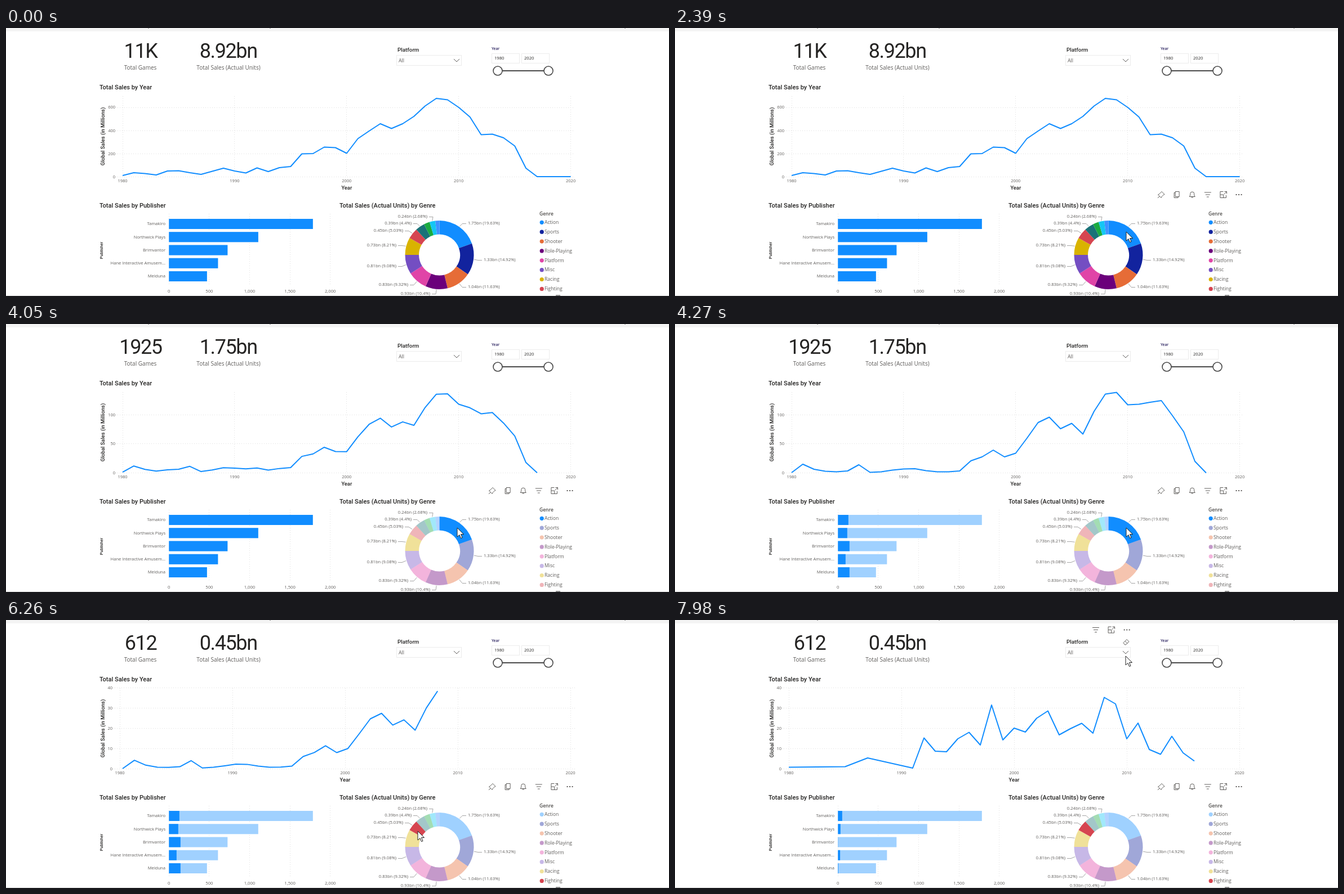
An HTML page with a canvas for the animation above (8000 ms loop, 1177x476 px).

```html
<!DOCTYPE html>
<html lang="en">
<head>
<meta charset="utf-8">
<title>Sales dashboard</title>
<style>
html, body { margin: 0; width: 100%; height: 100%; overflow: hidden; background: #fff; }
canvas { display: block; }
</style>
</head>
<body>
<canvas id="stage" width="1177" height="476"></canvas>
<script>
const ctx = document.getElementById('stage').getContext('2d');
const LOOP = 8000, BASE = 264.3;
const INK = '#252423', GREY = '#605e5c', BLUE = '#118dff';
const SANS = '"Open Sans", sans-serif', DIN = 'Roboto, sans-serif';

// Line heights are y positions on the stage, one per year.
const allYears = [262, 257, 258.5, 261, 254, 253.5, 257, 260, 254.5, 249, 254, 257.5, 248.5, 255,
  248, 246, 223.5, 223, 211.5, 212.5, 222.5, 196.5, 183, 170, 178.5, 170, 157, 138.5, 125, 127.5,
  141, 158, 189.5, 188.5, 195, 209.5, 249, 264, 264, 264, 264];
const actionYears = [264, 249, 258, 261.5, 262.5, 261, 250, 263.5, 262.5, 259.5, 257.5, 257, 260.5, 262.5,
  262.5, 261, 243, 236, 224, 236, 229.5, 203, 175, 165.5, 186, 176.5, 195.5, 155, 124.5, 121.5,
  143.5, 142.5, 139, 136, 163, 191.5, 244, 264.5];
const fightingYears = [261.5, 260.5, 245, 263, 209.5, 233, 234, 211, 199.5, 222, 151, 213, 192, 199,
  174.5, 161.5, 204, 193, 183.5, 201, 137.5, 149, 211, 183, 230, 238.5, 206.5, 236, 250.5];

const place = (ys, left, step, yearOf = i => i) => ys.map((y, i) => [left + step * yearOf(i), y]);
const views = [
  { games: '11K', sales: '8.92bn', left: 207, step: 19.89, tick: 200, gap: 41.1, ticks: 4, picked: -1,
    bars: [255.5, 158.5, 104, 87, 67.5], line: place(allYears, 207, 19.89) },
  { games: '1925', sales: '1.75bn', left: 207, step: 19.89, tick: 50, gap: 51.4, ticks: 3, picked: 0,
    bars: [18.5, 16.5, 20.5, 13.5, 20.5], line: place(actionYears, 207, 19.89) },
  { games: '612', sales: '0.45bn', left: 202, step: 20, tick: 10, gap: 35.9, ticks: 5, picked: 7,
    bars: [7.5, 4.5, .3, 3.8, .8],
    line: place(fightingYears, 202, 20, i => i < 3 ? [0, 5, 7][i] : i + 8) }
];
const clicks = [
  { pick: 3290, cards: 3500, line: [3800, 4270], bars: [4040, 4270] },
  { pick: 5910, cards: 6120, line: [6200, 6600], bars: [6380, 6600] }
];

const publishers = ['Tamakiro', 'Northwick Plays', 'Brimvantor', 'Hane Interactive Amusem...', 'Melduna'];
const genres = ['Action', 'Sports', 'Shooter', 'Role-Playing', 'Platform', 'Misc', 'Racing', 'Fighting'];
const shares = [19.63, 14.92, 11.63, 10.4, 9.32, 9.08, 8.21, 5.03, 4.4, 2.74, 2.68, 1.96];
const colors = [BLUE, '#12239e', '#e66c37', '#6b007b', '#e044a7', '#744ec2', '#d9b300', '#d64550',
  '#197278', '#1aab40', '#15c6f4', '#4092ff'];
const callouts = [
  ['1.75bn (19.63%)', 0, 820, 347], ['1.33bn (14.92%)', 1, 848, 412], ['1.04bn (11.63%)', 2, 820, 460],
  ['0.93bn (10.4%)', 3, 753, 472], ['0.83bn (9.32%)', 4, 714, 456], ['0.81bn (9.08%)', 5, 693, 423],
  ['0.73bn (8.21%)', 6, 693, 386], ['0.45bn (5.03%)', 7, 705, 360], ['0.39bn (4.4%)', 8, 720, 347],
  ['0.24bn (2.68%)', 10, 748, 335]
];
// time, x, y
const pointer = [[400, 1081, 450], [720, 922, 318], [965, 922, 318], [970, 921, 317], [1130, 921, 317],
  [1230, 901, 309], [1890, 806, 357], [1940, 806, 357], [2390, 801, 362], [4880, 801, 362],
  [4980, 788, 360], [5250, 788, 360], [5350, 742, 355], [5440, 718, 364], [5680, 731, 375],
  [7170, 731, 375], [7900, 800, 65], [7980, 800, 64]];

const icons = {
  pin: 'M1-5.5L6-.5L4 .5L1 3.5L0 5.5L-5.5 0L-3.5-1L-.5-4ZM-3 3L-6 6',
  copy: 'M-2.5-5.5H4.5V3.5H-2.5ZM-2.5-3.5H-4.5V5.5H2.5V3.5',
  bell: 'M-5 3.5H5L3.5 1V-1.5A3.5 3.5 0 0 0-3.5-1.5V1ZM-1.5 3.5A1.5 1.8 0 0 0 1.5 3.5',
  filter: 'M-6-4H6M-4 0H4M-2 4H2',
  focus: 'M0-5.5H-5.5V5.5H5V1M2-5.5H6V-1.5M6-5.5L1-.5M-5.5 0H0V5.5',
  more: 'M-5.5 0h2M-1 0h2M3.5 0h2',
  eraser: 'M-5 1.5L1-4.5L5-.5L-1 5H-2.5ZM-2-1.5L2 2.5',
  chevron: 'M-5-2.5L0 2.5L5-2.5',
  arrow: 'M0 0V16L4 12.5L6.5 18.5L9 17.5L6.5 11.5H11.5Z'
};
for (const name in icons) icons[name] = new Path2D(icons[name]);

const mix = (a, b, p) => a + (b - a) * p;
const progress = (t, [from, to]) => Math.min(1, Math.max(0, (t - from) / (to - from)));
const ease = p => p < .5 ? 4 * p ** 3 : 1 - 4 * (1 - p) ** 3;

function text(str, x, y, size, { font = SANS, color = GREY, align = 'left', weight = 400, spacing = 0 } = {}) {
  ctx.font = `${weight} ${size}px ${font}`;
  ctx.letterSpacing = spacing + 'px';
  ctx.fillStyle = color;
  ctx.textAlign = align;
  ctx.fillText(str, x, y + .5);
}
const title = (str, x, y, size = 11, align = 'left') =>
  text(str, x, y, size, { font: DIN, color: INK, weight: 500, align });

function upright(str, x, y, size) {
  ctx.save();
  ctx.translate(x, y);
  ctx.rotate(-Math.PI / 2);
  title(str, 0, 0, size, 'center');
  ctx.restore();
}
function polyline(points, color, width, dash = []) {
  ctx.beginPath();
  points.forEach(p => ctx.lineTo(...p));
  ctx.strokeStyle = color;
  ctx.lineWidth = width;
  ctx.setLineDash(dash);
  ctx.stroke();
  ctx.setLineDash([]);
}
const grid = (x1, y1, x2, y2) => polyline([[x1, y1], [x2, y2]], '#dedede', 1, [1, 3]);

function icon(name, x, y, color = GREY, width = name === 'more' ? 2 : 1) {
  ctx.save();
  ctx.translate(x, y);
  ctx.strokeStyle = color;
  ctx.lineWidth = width;
  ctx.stroke(icons[name]);
  ctx.restore();
}
const toolbar = (names, x, y) => names.forEach((name, i) => icon(name, x + i * 27.6, y));

function box(x, y, w, h) {
  ctx.strokeStyle = '#ececec';
  ctx.lineWidth = 1;
  ctx.strokeRect(x + .5, y + .5, w, h);
}
function disc(x, y, r, color) {
  ctx.beginPath();
  ctx.arc(x, y, r, 0, 7);
  ctx.fillStyle = color;
  ctx.fill();
}

function drawFrame() {
  ctx.fillStyle = '#fff';
  ctx.fillRect(0, 0, 1177, 476);
  ctx.fillStyle = '#f4f4f4';
  ctx.fillRect(0, 0, 1177, 6);
  ctx.fillStyle = '#999';
  for (const x of [252, 468, 1098]) ctx.fillRect(x, 0, 2, 1);
  ctx.fillStyle = '#d4d4d4';
  ctx.fillRect(0, 475, 1177, 1);
  ctx.fillStyle = '#8a8a8a';
  ctx.fillRect(976, 474, 8, 2);
}

function drawSlicers() {
  title('Platform', 695, 38.5, 9.8);
  box(693, 48, 115, 18);
  text('All', 697, 58, 8.8);
  icon('chevron', 800, 57.5);
  text('Year', 862, 37, 6.7, { color: '#2b2360', weight: 600 });
  box(862, 45, 49, 17);
  box(915, 45, 49, 17);
  text('1980', 867, 53.5, 7.6, { color: INK });
  text('2020', 920, 53.5, 7.6, { color: INK });
  polyline([[873, 76], [963, 76]], '#4a4a4a', 2);
  for (const x of [873, 963]) {
    disc(x, 76, 8.8, '#4a4a4a');
    disc(x, 76, 7.2, '#fff');
  }
}

function drawCards(view) {
  const big = { font: DIN, color: INK, align: 'center', spacing: -1.4 };
  text(view.games, 239, 42.3, 36, big);
  text(view.sales, 394.7, 42.3, 36, big);
  text('Total Games', 238.5, 70.5, 10, { align: 'center' });
  text('Total Sales (Actual Units)', 395, 70.5, 10, { align: 'center' });
}

function drawLine(from, to, p) {
  const axis = p > 0 ? to : from, decade = axis.step * 10;
  title('Total Sales by Year', 166, 105);
  upright('Global Sales (in Millions)', 171.5, 192.5, 9.3);
  for (let i = 0; i < axis.ticks; i++) {
    const y = BASE - i * axis.gap;
    grid(axis.left - 9, Math.floor(y) + .5, 1010, Math.floor(y) + .5);
    text(i * axis.tick, axis.left - 13, y, 7.5, { align: 'right' });
  }
  for (let i = 0; i < 5; i++) {
    const x = axis.left + i * decade;
    grid(Math.floor(x) + .5, 121, Math.floor(x) + .5, 264);
    text(1980 + i * 10, x, 271.5, 7.5, { align: 'center' });
  }
  title('Year', axis.left + 2 * decade, 284, 9.4, 'center');
  const points = p > 0
    ? to.line.map(([x, y], i) => [mix(from.line[i][0], x, p), mix(from.line[i][1], y, p)])
    : from.line;
  ctx.lineJoin = 'round';
  polyline(points, BLUE, 2);
  ctx.lineJoin = 'miter';
}

function drawBars(from, to, p) {
  title('Total Sales by Publisher', 166, 315);
  upright('Publisher', 169.5, 395, 7.2);
  for (let i = 0; i < 5; i++) {
    const x = 289.3 + i * 71.6, y = 339 + i * 23.25;
    grid(Math.floor(x) + .5, 330, Math.floor(x) + .5, 458);
    text((i * 500).toLocaleString('en-US'), x, 467, 7.7, { align: 'center' });
    text(publishers[i], 283, y + 9, 7.6, { align: 'right' });
  }
  for (let i = 0; i < 5; i++) {
    const y = 339 + i * 23.25;
    ctx.fillStyle = '#a0d1ff';
    ctx.fillRect(289.3, y, views[0].bars[i], 18);
    ctx.fillStyle = BLUE;
    ctx.fillRect(289.3, y, mix(from.bars[i], to.bars[i], p), 18);
  }
}

function drawDonut(picked) {
  const cx = 769.5, cy = 403, mids = [];
  const alpha = i => picked < 0 || picked === i ? 1 : .4;
  title('Total Sales (Actual Units) by Genre', 592, 315);
  let angle = -Math.PI / 2;
  shares.forEach((share, i) => {
    const end = angle + share / 50 * Math.PI;
    mids.push((angle + end) / 2);
    ctx.beginPath();
    ctx.arc(cx, cy, 61, angle, end);
    ctx.arc(cx, cy, 36.5, end, angle, true);
    ctx.globalAlpha = alpha(i);
    ctx.fillStyle = colors[i];
    ctx.fill();
    angle = end;
  });
  ctx.globalAlpha = 1;
  for (const [label, slice, x, y] of callouts) {
    const side = x > cx ? -1 : 1, mid = mids[slice];
    text(label, x, y, 7.6, { align: side < 0 ? 'left' : 'right' });
    polyline([[x + 3 * side, y + .5], [x + 10 * side, y + .5],
      [cx + 62 * Math.cos(mid), cy + 62 * Math.sin(mid)]], '#a6a6a6', 1);
  }
  text('Genre', 947, 330.5, 8.5, { weight: 600, color: '#4a4846' });
  genres.forEach((genre, i) => {
    const y = 345.3 + i * 16.87;
    ctx.globalAlpha = alpha(i);
    disc(951.2, y, 3.6, colors[i]);
    ctx.globalAlpha = 1;
    text(genre, 956, y, 8.6);
  });
}

function drawPointer(t) {
  if (t < pointer[0][0]) return;
  let k = pointer.findIndex(stop => stop[0] > t);
  if (k < 0) k = pointer.length - 1;
  const [t0, x0, y0] = pointer[k - 1], [t1, x1, y1] = pointer[k];
  const p = progress(t, [t0, t1]), x = mix(x0, x1, p), y = mix(y0, y1, p);
  if (t > 540) toolbar(['pin', 'copy', 'bell', 'filter', 'focus', 'more'], 863, 296);
  if (y < 90) {
    toolbar(['filter', 'focus', 'more'], 747, 17.5);
    icon('eraser', 801, 39);
  }
  ctx.save();
  ctx.translate(x, y);
  ctx.fillStyle = '#fff';
  ctx.fill(icons.arrow);
  ctx.restore();
  icon('arrow', x, y, '#222', 1);
}

function render(t) {
  const stage = t < clicks[1].pick ? 0 : 1, click = clicks[stage];
  const from = views[stage], to = views[stage + 1];
  drawFrame();
  drawCards(t < click.cards ? from : to);
  drawSlicers();
  drawLine(from, to, ease(progress(t, click.line)));
  drawBars(from, to, ease(progress(t, click.bars)));
  drawDonut((t < click.pick ? from : to).picked);
  drawPointer(t);
}

ctx.textBaseline = 'middle';
const start = performance.now();
(function tick() {
  render((performance.now() - start) % LOOP);
  requestAnimationFrame(tick);
})();
</script>
</body>
</html>
```
